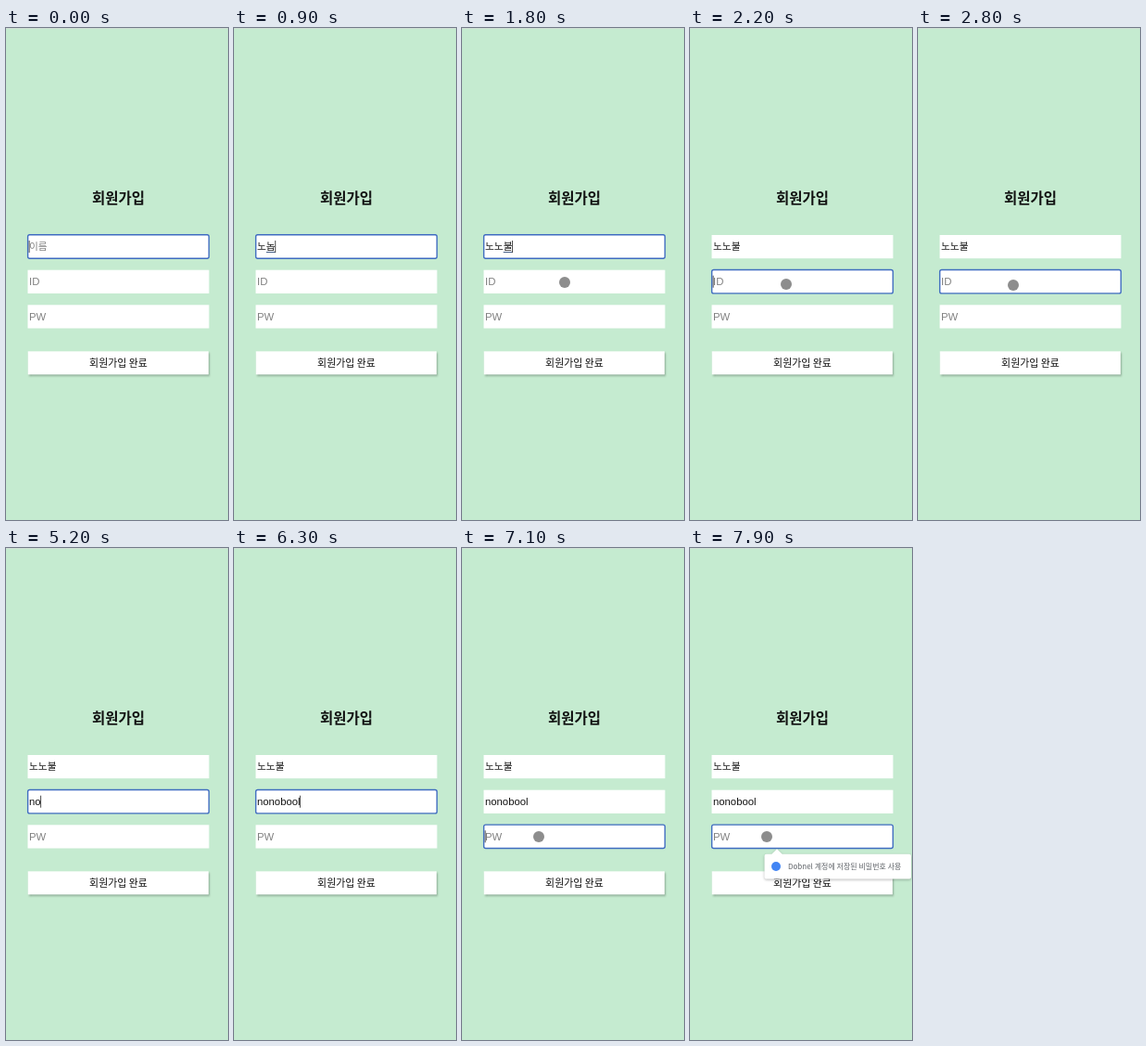
These frames come from a looping animation (240x530 px, 8 s). An HTML page with a canvas:

```html
<!DOCTYPE html>
<html lang="ko">
<head>
<meta charset="utf-8">
<title>회원가입</title>
<style>
  html, body { margin: 0; width: 100%; height: 100%; overflow: hidden; background: #c5ebd0; }
  canvas { display: block; width: 240px; height: 530px; }
</style>
</head>
<body>
<canvas id="stage"></canvas>
<script>
const W = 240, H = 530, LOOP = 8000;
const KR = '"Noto Sans CJK KR", "Noto Sans CJK", sans-serif';
const LATIN = '"Liberation Sans", "Noto Sans CJK KR", sans-serif';
const canvas = document.getElementById('stage');
const ctx = canvas.getContext('2d');
const dpr = window.devicePixelRatio || 1;
canvas.width = W * dpr;
canvas.height = H * dpr;

// Each key: [time, text, is the last syllable still being composed]
const fields = [
  { y: 223, hint: '이름', font: `10.7px ${KR}`, focus: 0, blur: 2200, keys: [
    [100, 'ㄴ', 1], [200, '노', 1], [300, '논', 1], [400, '노노', 1],
    [900, '노놉', 1], [1200, '노노부', 1], [1500, '노노불', 1]] },
  { y: 260.7, hint: 'ID', font: `11.3px ${LATIN}`, focus: 2200, blur: 7100, keys: [
    [3900, 'ㅜ', 1], [4200, 'ㅜㅐ', 1], [4700, 'ㅜ', 1], [4800, '', 0],
    [5200, 'no', 0], [5300, 'non', 0], [5400, 'nono', 0], [5800, 'nonob', 0],
    [6000, 'nonoboo', 0], [6200, 'nonobool', 0]] },
  { y: 298.3, hint: 'PW', font: `11.3px ${LATIN}`, focus: 7100, blur: LOOP, keys: [] }
];

// Pointer stops: [time, x, y]
const path = [[1800, 111, 274], [2200, 104, 276], [2600, 103, 277], [3200, 103, 277],
  [3700, 101, 277.5], [6500, 101, 277.5], [6900, 83, 311]];

function text(str, x, y, font, color, align = 'left') {
  ctx.font = font;
  ctx.fillStyle = color;
  ctx.textAlign = align;
  ctx.fillText(str, x, y);
}

function shadow(color, blur, x, y) {
  ctx.shadowColor = color;
  ctx.shadowBlur = blur * dpr;
  ctx.shadowOffsetX = x * dpr;
  ctx.shadowOffsetY = y * dpr;
}

function dot(x, y, r, color) {
  ctx.fillStyle = color;
  ctx.beginPath();
  ctx.arc(x, y, r, 0, Math.PI * 2);
  ctx.fill();
}

function drawField(f, t) {
  const key = f.keys.filter(k => k[0] <= t).pop();
  const value = key ? key[1] : '';
  const base = f.y + 16.2;
  const focused = t >= f.focus && t < f.blur;

  ctx.fillStyle = '#fff';
  ctx.fillRect(23.5, f.y, 196, 25.2);
  if (focused) {
    ctx.strokeStyle = '#3f6cc0';
    ctx.lineWidth = 1.4;
    ctx.beginPath();
    ctx.roundRect(23.6, f.y - 0.2, 195.8, 25.4, 2);
    ctx.stroke();
  }
  text(value || f.hint, 25, base, f.font, value ? '#111' : '#808080');
  if (!focused) return;

  const end = 25 + ctx.measureText(value).width * (value ? 1 : 0);
  if (key && key[2]) {
    const start = 25 + ctx.measureText(value.slice(0, -1)).width;
    ctx.fillStyle = '#34507c';
    ctx.fillRect(start, base + 1.9, end - start, 0.9);
  }
  const last = key ? Math.max(key[0], f.focus) : f.focus;
  if ((t - last) % 1000 < 500) {
    ctx.fillStyle = '#222';
    ctx.fillRect(end - 0.3, f.y + 6, 0.8, 13);
  }
}

function drawButton() {
  shadow('rgba(60,80,65,.4)', 2, 1.2, 1.5);
  ctx.fillStyle = '#fff';
  ctx.fillRect(23.7, 348.3, 195.3, 25);
  shadow('transparent', 0, 0, 0);
  text('회원가입 완료', 121.5, 364.6, `10.95px ${KR}`, '#111', 'center');
}

function drawPopup() {
  shadow('rgba(0,0,0,.28)', 3, 0, 1);
  ctx.fillStyle = '#fff';
  ctx.beginPath();
  ctx.roundRect(80.5, 329.7, 158.5, 26.8, 2);
  ctx.moveTo(88, 330);
  ctx.lineTo(94, 324.3);
  ctx.lineTo(100, 330);
  ctx.closePath();
  ctx.fill();
  shadow('transparent', 0, 0, 0);
  dot(93, 343, 5, '#4285f4');
  text('Dobnel 계정에 저장된 비밀번호 사용', 106, 346, `500 8px ${KR}`, '#5f6368');
}

function drawPointer(t) {
  const visible = (t >= 1800 && t < 3900) || t >= 6500;
  if (!visible) return;
  let i = 0;
  while (i < path.length - 2 && t >= path[i + 1][0]) i++;
  const [t0, x0, y0] = path[i], [t1, x1, y1] = path[i + 1];
  const p = Math.min(1, (t - t0) / (t1 - t0));
  const e = p * p * (3 - 2 * p);
  dot(x0 + (x1 - x0) * e, y0 + (y1 - y0) * e, 6, '#8d8d8d');
}

function draw(t) {
  ctx.setTransform(dpr, 0, 0, dpr, 0, 0);
  ctx.fillStyle = '#c5ebd0';
  ctx.fillRect(0, 0, W, H);
  ctx.fillStyle = '#d0dfd5';
  ctx.fillRect(0, 0, W, 1);
  text('회원가입', 121.5, 188.8, `bold 15.5px ${KR}`, '#111', 'center');
  fields.forEach(f => drawField(f, t));
  drawButton();
  if (t >= 7200) drawPopup();
  drawPointer(t);
}

const begin = performance.now();
function frame() {
  draw((performance.now() - begin) % LOOP);
  requestAnimationFrame(frame);
}
frame();
</script>
</body>
</html>
```
